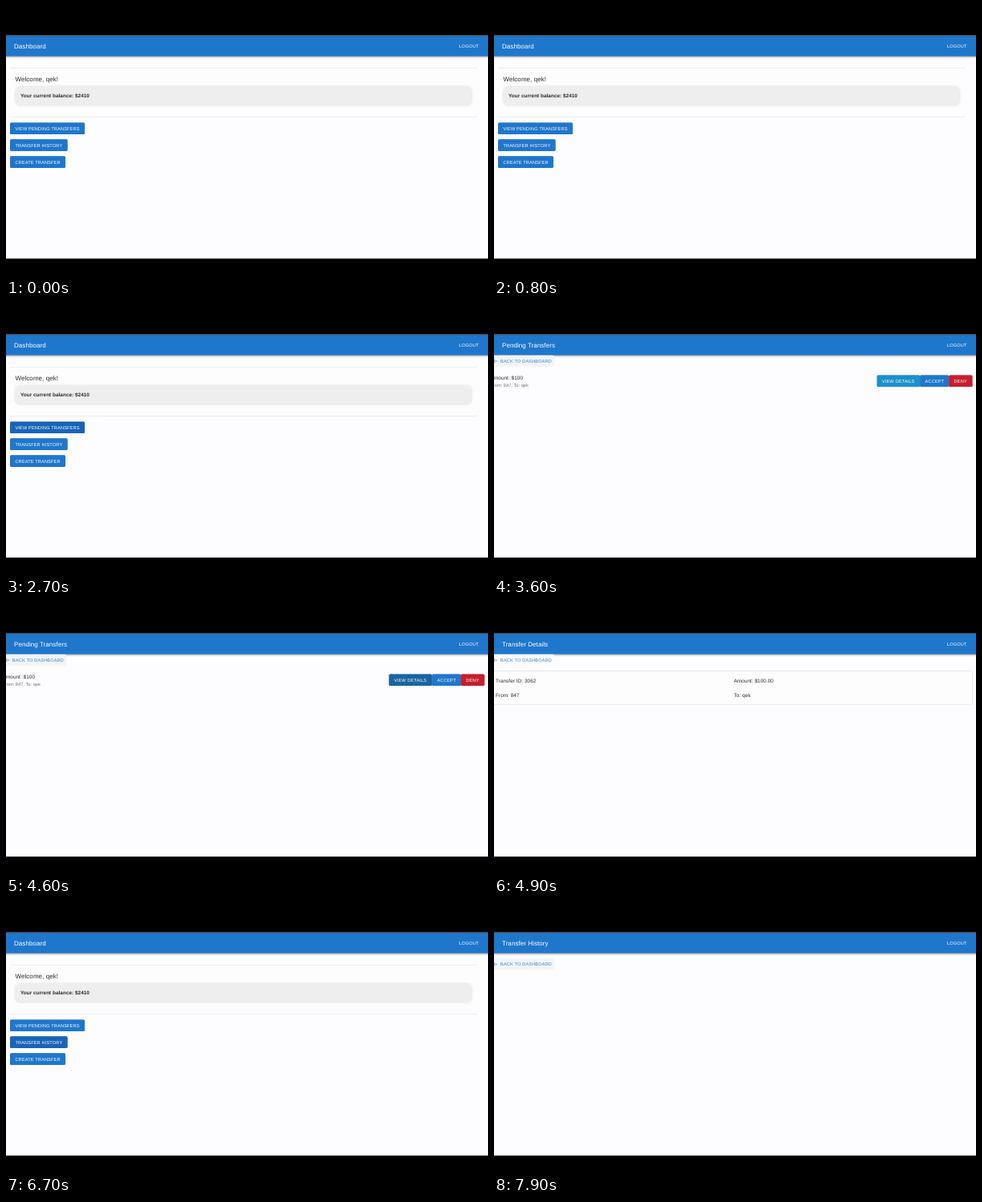
Write an HTML page that moves like this. It is 600 px wide and 338 px high and loops after 8 s.

```html
<!DOCTYPE html>
<html lang="en">
<head>
<meta charset="utf-8">
<style>
  html, body { margin: 0; width: 100%; height: 100%; overflow: hidden; background: #000; }
  svg { display: block; width: 600px; height: 338px; }
  text { font-family: "Liberation Sans", Arial, sans-serif; text-rendering: geometricPrecision; white-space: pre; }
  .h6 { font-size: 8px; letter-spacing: .06px; }
  .body { font-size: 6.4px; letter-spacing: .05px; }
  .strong { font-size: 6.4px; font-weight: 700; letter-spacing: .03px; }
  .small { font-size: 5.6px; letter-spacing: .05px; }
  .label { font-size: 5.6px; letter-spacing: .16px; }
  .raised { filter: drop-shadow(0 .7px .6px rgba(0,0,0,.35)); }
  .card { filter: drop-shadow(0 .6px .6px rgba(0,0,0,.32)); }
  .soft { filter: drop-shadow(0 .8px 1.6px rgba(0,0,0,.12)); }
  .bar { filter: drop-shadow(0 1px 1.2px rgba(0,0,0,.4)); }
</style>
</head>
<body>
<svg id="stage" viewBox="0 0 600 338"></svg>
<script>
const LOOP = 8000, BLUE = '#1f77cc', INK = '#2b2b2d';
const user = 'qek', sender = '847';

const text = (x, y, str, cls, fill = INK) =>
  `<text x="${x}" y="${y}" class="${cls}" fill="${fill}">${str}</text>`;
const rect = (x, y, w, h, r, fill, cls = '', id = '') =>
  `<rect x="${x}" y="${y}" width="${w}" height="${h}" rx="${r}" fill="${fill}" class="${cls}" id="${id}"/>`;
const button = (x, y, w, label, fill = BLUE, id = '') =>
  rect(x, y, w, 14.6, 1.6, fill, 'raised', id) + text(x + 6.4, y + 9.3, label, 'label', '#fff');
const backLink = (y, id = '') =>
  rect(-6, y - 7.3, 81, 14.6, 1.6, '#f1f5fa', '', id) +
  `<path d="M1 ${y - 2.3}l-2.3 2.3 2.3 2.3M-1.3 ${y}H4" fill="none" stroke="#3a80bd" stroke-width=".8"/>` +
  text(8, y + 2, 'BACK TO DASHBOARD', 'label', '#3a80bd');

const pages = {
  dashboard: ['Dashboard',
    rect(5, 77.3, 581, 61.4, 1.6, '#fdfdfe', 'card') +
    text(11.5, 94.3, `Welcome, ${user}!`, 'h6') +
    rect(11.5, 100.6, 568, 23.3, 6, '#eee', 'soft') +
    text(18, 114.2, 'Your current balance: $2410', 'strong') +
    button(5, 145.4, 93, 'VIEW PENDING TRANSFERS', BLUE, 'pendingBtn') +
    button(5, 166.3, 71.6, 'TRANSFER HISTORY', BLUE, 'historyBtn') +
    button(5, 187.3, 69, 'CREATE TRANSFER')],
  pending: ['Pending Transfers',
    backLink(70) +
    text(-4.4, 93, 'Amount: $100', 'body') +
    text(-4.6, 101.5, `From: ${sender}, To: ${user}`, 'small', '#707072') +
    button(476.7, 87.4, 53.5, 'VIEW DETAILS', BLUE, 'detailsBtn') +
    button(530.2, 87.4, 36, 'ACCEPT') +
    button(566.2, 87.4, 29.4, 'DENY', '#c61f2f')],
  details: ['Transfer Details',
    backLink(70, 'backBtn') +
    rect(-6, 83.4, 601.7, 41.8, 1.6, '#fdfdfe', 'raised') +
    text(2, 97.9, 'Transfer ID: 3062', 'body') +
    text(298.5, 97.9, 'Amount: $100.00', 'body') +
    text(2, 115.5, `From: ${sender}`, 'body') +
    text(298.5, 115.5, `To: ${user}`, 'body')],
  history: ['Transfer History', backLink(76.3)]
};

const stage = document.getElementById('stage');
stage.innerHTML =
  rect(0, 0, 600, 338, 0, '#000') +
  rect(0, 36.5, 600, 278.5, 0, '#fdfcfe') +
  rect(-4, 37, 608, 25.6, 0, BLUE, 'bar') +
  rect(0, 36, 600, 1.4, 0, '#4c4a50') +
  text(564, 51.9, 'LOGOUT', 'label', '#fff') +
  Object.entries(pages).map(([name, [title, body]]) =>
    `<g id="${name}">${text(10, 52.8, title, 'h6', '#fff')}${body}</g>`).join('');

const scenes = [[0, 'dashboard'], [3000, 'pending'], [4900, 'details'], [6200, 'dashboard'], [7000, 'history']];
// Each hover: element, start, end, resting colour, hovered colour
const hovers = [
  ['pendingBtn', 2200, 3000, [31, 119, 204], [24, 101, 184]],
  ['detailsBtn', 4200, 4900, [27, 144, 201], [26, 100, 159]],
  ['backBtn', 5500, 6200, [253, 252, 254], [243, 246, 250]],
  ['historyBtn', 6400, 7000, [31, 119, 204], [24, 101, 184]]
];
const el = id => document.getElementById(id);

function draw(now) {
  const t = now % LOOP;
  const current = scenes.filter(([start]) => t >= start).pop()[1];
  for (const name in pages) el(name).style.display = name === current ? '' : 'none';
  for (const [id, start, end, rest, hot] of hovers) {
    const k = t < end ? Math.min(1, Math.max(0, (t - start) / 250)) : 0;
    const ease = k * k * (3 - 2 * k);
    el(id).setAttribute('fill', `rgb(${rest.map((c, i) => c + (hot[i] - c) * ease)})`);
  }
  requestAnimationFrame(draw);
}

const begin = performance.now();
draw(0);
function tick() { return performance.now() - begin; }
</script>
</body>
</html>
```
